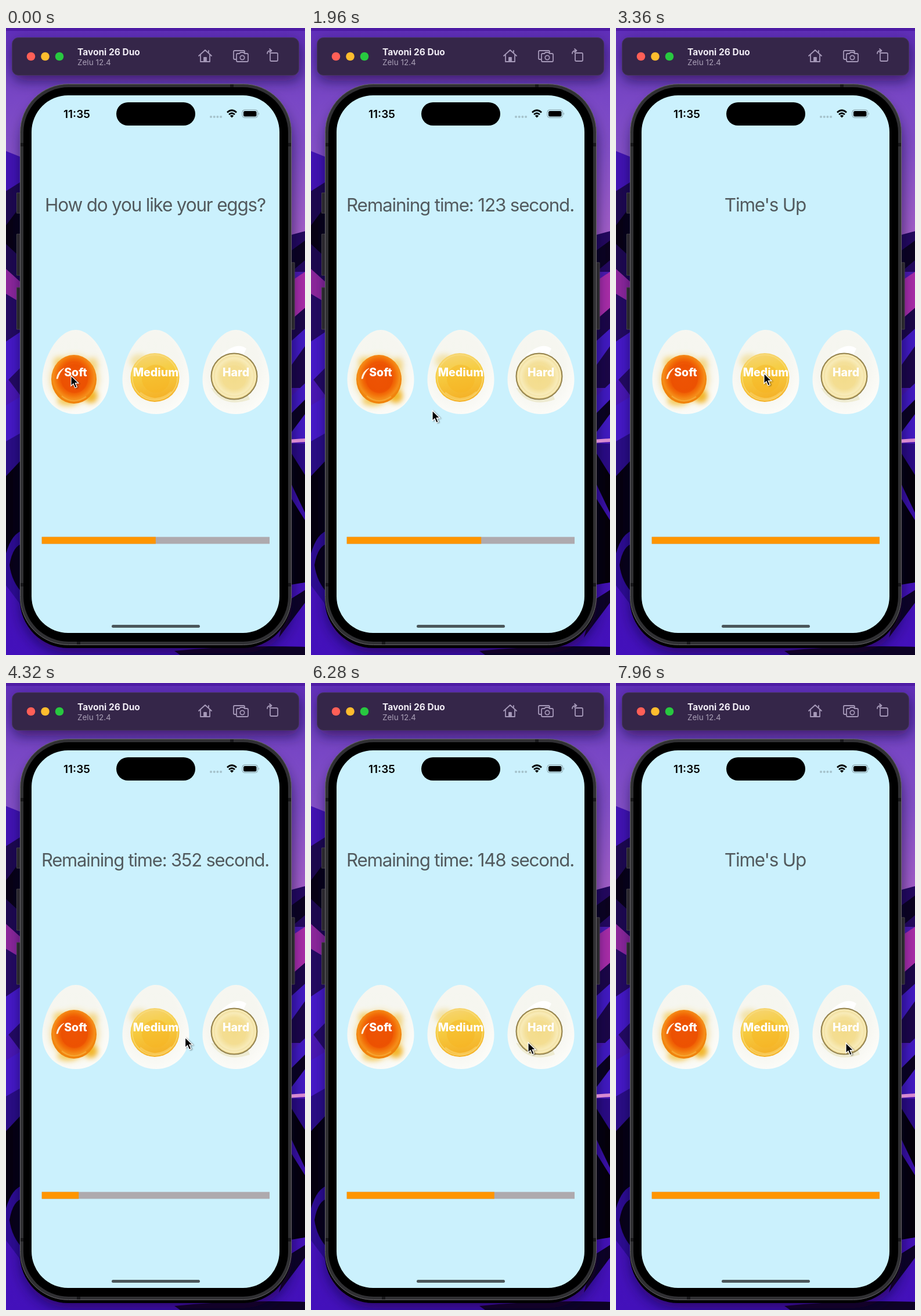
These frames come from a looping animation (515x1080 px, 8000 ms). An HTML page:

```html
<!DOCTYPE html>
<html lang="en">
<head>
<meta charset="utf-8">
<title>Egg timer</title>
<style>
html, body { margin: 0; width: 100%; height: 100%; overflow: hidden; background: #2c0f8c; }
svg { display: block; width: 100%; height: 100%; font-family: Inter, Roboto, sans-serif; font-optical-sizing: none; }
.mid { text-anchor: middle; }
.icon { fill: none; stroke: #a598b8; stroke-width: 1.8; stroke-linejoin: round; stroke-linecap: round; }
#label { fill: #525a5e; letter-spacing: -.038em; }
.name { fill: #fff; font-size: 19.5px; font-weight: 800; }
</style>
</head>
<body>
<svg viewBox="0 0 515 1080">
  <defs>
    <linearGradient id="sky" x2="0" y2="1">
      <stop offset="0" stop-color="#5f2dba"/><stop offset=".08" stop-color="#7443c4"/>
      <stop offset=".2" stop-color="#8450c8"/><stop offset=".33" stop-color="#a35fc9"/>
      <stop offset=".36" stop-color="#4d1bb0"/><stop offset="1" stop-color="#4310bb"/>
    </linearGradient>
    <radialGradient id="white" cx=".45" cy=".42" r=".65">
      <stop offset="0" stop-color="#f5f6ef"/><stop offset=".6" stop-color="#f6f6f0"/><stop offset="1" stop-color="#fdfdfa"/>
    </radialGradient>
    <radialGradient id="soft" cx=".5" cy=".45">
      <stop offset="0" stop-color="#f05a08"/><stop offset=".6" stop-color="#ee5603"/>
      <stop offset=".75" stop-color="#f26e08"/><stop offset=".92" stop-color="#f58e1a"/><stop offset="1" stop-color="#f0830c"/>
    </radialGradient>
    <linearGradient id="medium" x2=".2" y2="1">
      <stop offset="0" stop-color="#f6d67c"/><stop offset=".45" stop-color="#f6cd42"/><stop offset="1" stop-color="#f5b228"/>
    </linearGradient>
    <radialGradient id="hard">
      <stop offset="0" stop-color="#f3dc8c"/><stop offset=".6" stop-color="#f4e09a"/>
      <stop offset=".8" stop-color="#f8ebb8"/><stop offset="1" stop-color="#ecd58c"/>
    </radialGradient>
    <filter id="blur" x="-50%" y="-50%" width="200%" height="200%"><feGaussianBlur stdDeviation="5"/></filter>
    <filter id="drop" x="-20%" y="-30%" width="140%" height="190%">
      <feDropShadow dy="9" stdDeviation="12" flood-color="#12042c" flood-opacity=".6"/>
    </filter>
    <filter id="tip" x="-50%" y="-50%" width="200%" height="200%">
      <feDropShadow dy="1" stdDeviation="1" flood-opacity=".4"/>
    </filter>
    <path id="egg" d="M0-80C31-80 57.500-30 57.500 6C57.500 41 32 65 0 65S-57.500 41-57.500 6C-57.500-30-31-80 0-80Z"/>
    <clipPath id="inEgg"><use href="#egg"/></clipPath>
  </defs>

  <!-- wallpaper -->
  <rect width="515" height="1080" fill="url(#sky)"/>
  <rect width="515" height="5" fill="#4f1ca6"/>
  <path fill="#4213b4" d="M0 212L30 224V480H0Z"/>
  <path fill="#1d0850" d="M0 281L30 262V440H0Z"/>
  <path fill="#070115" d="M0 340L30 300V400L0 372Z"/>
  <path fill="#8c279c" d="M0 415L30 442V476L0 458Z"/>
  <path fill="#240a62" d="M0 458L30 476V640L0 600Z"/>
  <path fill="#4619c8" d="M0 540L30 520V580L0 610ZM0 650L30 632V760H0Z"/>
  <path fill="#2a0d86" d="M0 712L30 695V772H0Z"/>
  <path fill="#050010" d="M0 772L30 740V900L0 945Z"/>
  <path fill="#2d0c93" d="M0 905Q10 870 30 865V1000L0 960Z"/>
  <path fill="#080117" d="M6 925Q12 890 30 888V975Q10 955 6 925Z"/>
  <path fill="#24085f" d="M485 358L515 350V420H485Z"/>
  <path fill="#0b021f" d="M485 388L515 366V400L485 425Z"/>
  <path fill="#a92da9" d="M485 440L515 420V490L485 515Z"/>
  <path fill="#1b0648" d="M485 508L515 482V620H485Z"/>
  <path fill="#421ac3" d="M485 545L515 518V548L485 590ZM485 640L515 612V708H485Z"/>
  <path fill="#0a021e" d="M485 670L515 640V665L485 705Z"/>
  <path fill="#2b0b86" d="M485 716H515V850H485Z"/>
  <path fill="#040009" d="M485 722L515 770V955L485 960Z"/>
  <path fill="#3a10a7" d="M485 772L515 835V848L485 800Z"/>
  <path fill="#0d0225" d="M290 1073Q400 1062 515 1066V1080H300ZM488 985L515 968V990L470 1050Z"/>

  <!-- soft shade cast by the phone -->
  <rect x="24" y="108" width="467" height="960" rx="83" filter="url(#drop)"/>
  <path fill="#d88bd0" d="M485 709L515 707V713L485 715Z"/>

  <!-- window bar -->
  <rect x="10.500" y="16.500" width="494" height="65" rx="11" fill="#35274a" stroke="#46365e" filter="url(#drop)"/>
  <circle cx="43" cy="49" r="7.300" fill="#ff5f57"/>
  <circle cx="67.500" cy="49" r="7.300" fill="#febc2e"/>
  <circle cx="92" cy="49" r="7.300" fill="#28c840"/>
  <text x="123" y="46.500" font-size="15.500" font-weight="700" fill="#f1edf5">Tavoni 26 Duo</text>
  <text x="123" y="64" font-size="13.500" fill="#aaa0b7">Zelu 12.4</text>
  <g class="icon">
    <path d="M332 48L343 38L354 48M335 46V58H351V46M349 42V39"/>
    <path d="M341 58V51H345V58" fill="#a598b8"/>
    <path d="M396 54H394Q392 54 392 52V41Q392 39 394 39H409Q411 39 411 41V42M399 44H402L404 42H409L411 44H415Q417 44 417 46V56Q417 58 415 58H399Q397 58 397 56V46Q397 44 399 44Z"/>
    <circle cx="407" cy="51" r="3.700"/>
    <rect x="455" y="43" width="13" height="14" rx="2"/>
    <path d="M450 44Q450 39 457 39M454 36L457.500 39L454 42"/>
  </g>

  <!-- phone -->
  <path fill="#29272d" stroke="#444148" d="M18.500 284H25V319H18.500ZM18.500 355H25V426H18.500ZM18.500 447H25V519H18.500ZM490 404H497V519H490Z"/>
  <rect x="24.500" y="96.500" width="467" height="966" rx="83" fill="#303033" stroke="#68666b"/>
  <path stroke="#19191b" stroke-width="6" d="M25 201H31M485 201H491M25 959H31M485 959H491M389 97V102M125 1057V1062"/>
  <rect x="30" y="102" width="456" height="955" rx="78"/>
  <rect x="44" y="116" width="427" height="926" rx="63" fill="#cbf1fd"/>
  <text x="99" y="154.500" font-size="19" font-weight="600">11:35</text>
  <rect x="190" y="128" width="136" height="40" rx="20"/>
  <path d="M353 153H371" stroke="#a5c2cb" stroke-width="4" stroke-linecap="round" stroke-dasharray="0 5.700"/>
  <path d="M381 145.500Q389 138 397 145.500M384 149Q389 144.500 394 149" fill="none" stroke="#000" stroke-width="2.700"/>
  <path d="M389 154.500L385.800 151.200Q389 148.700 392.200 151.200Z"/>
  <rect x="407" y="141" width="26.500" height="13.500" rx="4" fill="none" stroke="#839ba2"/>
  <rect x="409" y="143" width="22.500" height="9.500" rx="2.500"/>
  <path d="M435 145.500Q437 147.700 435 150Z" fill="#839ba2"/>
  <rect x="182" y="1028" width="152" height="5" rx="2.500" fill="#4b575b"/>

  <text id="label" class="mid" x="257" y="316"></text>

  <!-- eggs -->
  <g transform="translate(120 600)">
    <use href="#egg" fill="url(#white)"/>
    <g clip-path="url(#inEgg)">
      <g filter="url(#blur)" fill="#f3c445">
        <ellipse cx="-2" cy="5" rx="43" ry="43" opacity=".4"/>
        <ellipse cx="-28" cy="-25" rx="11" ry="9" opacity=".6"/>
        <ellipse cx="-14" cy="43" rx="18" ry="8" opacity=".8"/>
        <ellipse cx="26" cy="34" rx="12" ry="12" fill="#f2b62c"/>
        <ellipse cx="30" cy="-21" rx="9" ry="12" opacity=".5"/>
      </g>
    </g>
    <ellipse cx="-3" cy="5" rx="39" ry="42" fill="url(#soft)"/>
    <ellipse cx="-2" cy="4" rx="23" ry="25" fill="#e94d00" opacity=".45"/>
    <path d="M-33 4Q-31-9-20-14Q-28-7-31 4Z" fill="#fff0dc" stroke="#fff0dc"/>
    <path d="M-24 34Q-4 50 18 35" fill="none" stroke="#f8aa37" stroke-width="2.500" opacity=".8"/>
  </g>
  <g transform="translate(258 600)">
    <use href="#egg" fill="url(#white)"/>
    <g clip-path="url(#inEgg)">
      <ellipse cx="-28" cy="-26" rx="16" ry="12" fill="#f1dc91" opacity=".75" filter="url(#blur)"/>
    </g>
    <circle cx="-1.500" cy="2" r="42" fill="url(#medium)"/>
    <circle cx="-1.500" cy="2" r="39" fill="none" stroke="#fbdf83" stroke-width="2" opacity=".6"/>
    <circle cx="0" cy="4" r="24" fill="#f5b420" opacity=".45"/>
    <path d="M-27 28Q0 50 27 27" fill="none" stroke="#fad268" stroke-width="3" opacity=".7"/>
  </g>
  <g transform="translate(396 600)">
    <use href="#egg" fill="url(#white)"/>
    <path d="M-27-35Q0-61 18-48L13-37Q-5-46-27-35Z" fill="#fff"/>
    <path d="M-43 20Q-22 56 24 40L20 30Z" fill="#eeebd2"/>
    <circle cx="-3" cy="0" r="39.500" fill="url(#hard)" stroke="#94834f" stroke-width="2"/>
    <circle cx="-3" cy="-.5" r="36.500" fill="none" stroke="#faf0c4" stroke-width="2" opacity=".8"/>
    <circle cx="-3" cy="2" r="21" fill="#f2d987" opacity=".4"/>
  </g>
  <g class="name mid">
    <text x="120" y="600">Soft</text><text x="258" y="600">Medium</text><text x="396" y="600">Hard</text>
  </g>

  <rect x="61.700" y="876.600" width="392.300" height="11.900" fill="#aeaaae"/>
  <rect id="bar" x="61.700" y="876.600" height="11.900" fill="#ff9500"/>
  <path id="cursor" d="M0 0V17.500L4 13.800L7 20.800L10.200 19.500L7.200 12.600H12.700Z" stroke="#fff" stroke-width="1.200" filter="url(#tip)"/>
</svg>
<script>
const LOOP = 8000, STEP = 40, BAR = 392.3, FONT = 31.5;
const label = document.getElementById("label");
const bar = document.getElementById("bar");
const cursor = document.getElementById("cursor");

// start time, length in counted seconds, real ms per counted second
const timers = [
  { start: 260, total: 300, tick: 9.6 },
  { start: 3657, total: 420, tick: 9.64 }
];

// time, x, y of the pointer
const path = [
  [0, 112, 599], [320, 112, 599], [1000, 167, 625], [1960, 209, 659],
  [3000, 255, 595], [3760, 255, 595], [4900, 365, 627], [5200, 365, 627],
  [6280, 374, 619], [7400, 396, 620], [LOOP, 396, 620]
];

function pointer(t) {
  const i = path.findIndex(p => p[0] > t);
  const [t0, x0, y0] = path[i - 1], [t1, x1, y1] = path[i];
  const k = (t - t0) / (t1 - t0), e = k * k * (3 - 2 * k);
  return [x0 + (x1 - x0) * e, y0 + (y1 - y0) * e];
}

function state(t) {
  const timer = timers.findLast(m => t >= m.start);
  if (!timer) return ["How do you like your eggs?", 0.5];
  const done = Math.floor((t - timer.start) / timer.tick);
  if (done >= timer.total) return ["Time's Up", 1];
  return [`Remaining time: ${timer.total - done} second.`, done / timer.total];
}

// long messages shrink to the width of the label
function setLabel(text) {
  if (label.textContent === text) return;
  label.textContent = text;
  label.style.fontSize = FONT + "px";
  const width = label.getComputedTextLength();
  label.style.fontSize = FONT * Math.min(1, BAR / width) + "px";
}

function draw(now) {
  const t = Math.floor(now % LOOP / STEP) * STEP;
  const [text, progress] = state(t);
  setLabel(text);
  bar.setAttribute("width", BAR * progress);
  cursor.setAttribute("transform", `translate(${pointer(t)})`);
  requestAnimationFrame(draw);
}
draw(0);
</script>
</body>
</html>
```
